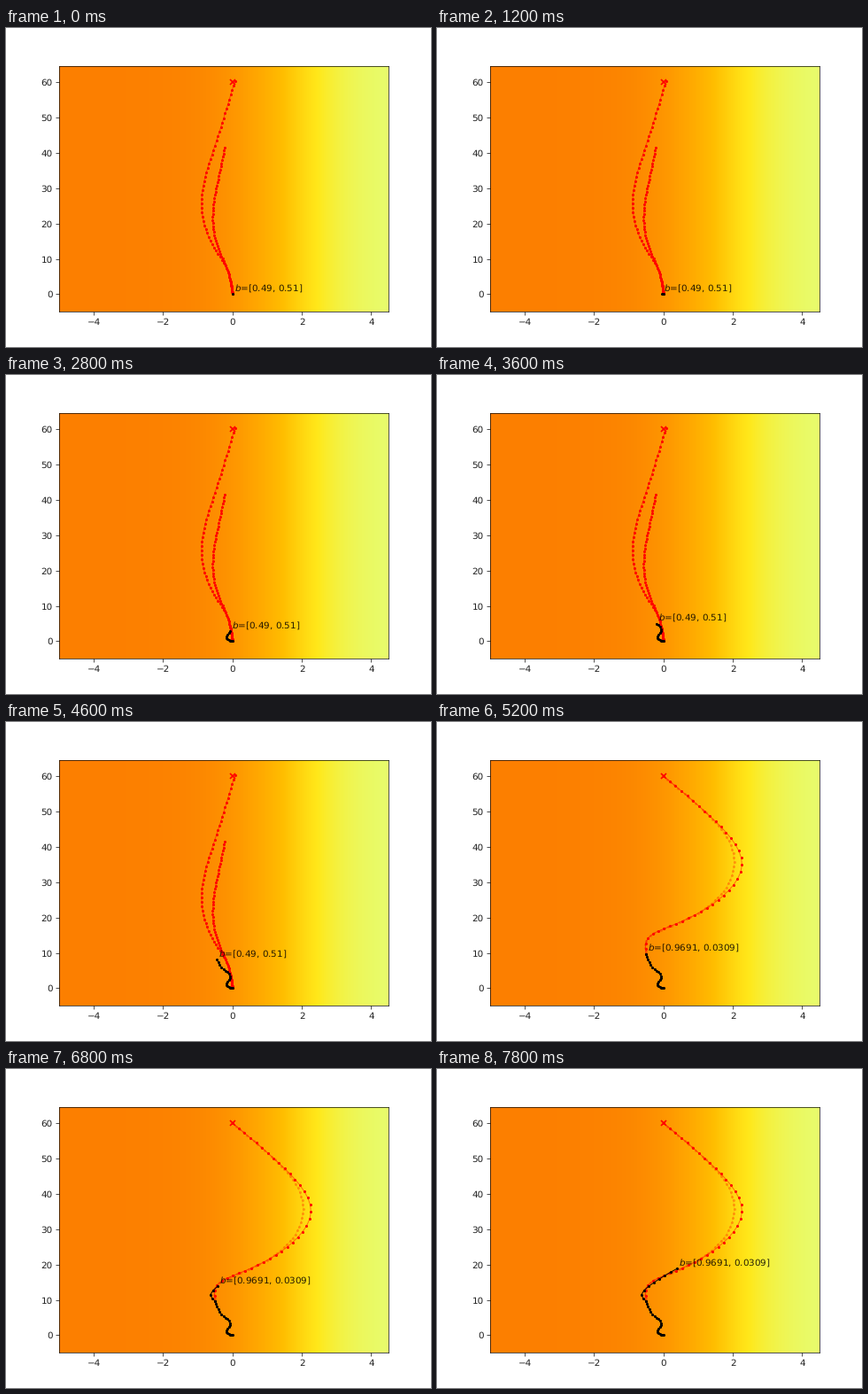
Animation, 480 px wide and 360 px high, one loop 8000 ms. Source, as a matplotlib script:

```python
import numpy as np
import matplotlib.pyplot as plt
from matplotlib.animation import FuncAnimation

plt.rcParams.update({
    "font.family": "DejaVu Sans", "text.hinting": "none",
    "axes.linewidth": 0.65, "xtick.major.width": 0.65,
    "ytick.major.width": 0.65, "xtick.labelcolor": "#222222",
    "ytick.labelcolor": "#222222",
})

XLIM, YLIM = (-5, 4.5), (-5, 64.5)
SCALE = np.array([39.16, 3.99])   # pixels per data unit
REPLAN, STEPS = 22, 31            # step of the second plan, last step

fig, ax = plt.subplots(figsize=(6.4, 4.8), dpi=75)

# Light-dark field: uncertainty falls off towards the right
xs = np.linspace(*XLIM, 760)
field = 1 / (1 + np.exp((xs - 1.45) / 0.93))
ax.imshow(field[None, :], cmap="Wistia", vmin=0, vmax=1, aspect="auto",
          extent=(*XLIM, *YLIM))
ax.set_xlim(XLIM)
ax.set_ylim(YLIM)


def arc(pts):
    """Cumulative on-screen length along a polyline."""
    seg = np.hypot(*(np.diff(pts, axis=0) * SCALE).T)
    return np.concatenate([[0], np.cumsum(seg)])


def spline(keys, n=600):
    """Natural cubic spline through a few key points."""
    p = np.array(keys, float)
    t = arc(p)
    h = np.diff(t)
    slope = np.diff(p, axis=0) / h[:, None]
    mat, rhs = np.eye(len(p)), np.zeros_like(p)
    for j in range(1, len(p) - 1):
        mat[j, j - 1:j + 2] = h[j - 1], 2 * (h[j - 1] + h[j]), h[j]
        rhs[j] = 6 * (slope[j] - slope[j - 1])
    bend = np.linalg.solve(mat, rhs)
    u = np.linspace(0, t[-1], n)
    i = np.clip(np.searchsorted(t, u, side="right") - 1, 0, len(h) - 1)
    w = h[i][:, None]
    b = (u - t[i])[:, None] / w
    a = 1 - b
    return (a * p[i] + b * p[i + 1]
            + ((a**3 - a) * bend[i] + (b**3 - b) * bend[i + 1]) * w**2 / 6)


def sample(curve, n, ease):
    """n points along the curve, spaced by an easing of its length."""
    s = ease(np.linspace(0, 1, n))
    length = arc(curve)
    s = s / s[-1] * length[-1]
    return np.column_stack([np.interp(s, length, c) for c in curve.T])


def power(p):
    return lambda u: u**p


def settle(u):
    """Slow start that settles at a steady speed."""
    return u - 0.24 * (1 - np.exp(-4 * u))


def branch(curve, n, ease, alpha=1.0):
    x, y = sample(curve, n, ease).T
    line, = ax.plot(x, y, "r-", lw=0.9, alpha=0.5 * alpha)
    dots, = ax.plot(x, y, "r.", ms=3.8, alpha=alpha)
    return [line, dots]


stem = [(0, 0), (-.15, 6.9)]
left = spline(stem + [(-.56, 13.7), (-.89, 25), (-.51, 42), (.07, 60.4)])
right = spline(stem + [(-.46, 14.2), (-.57, 21.2), (-.4, 33.2), (-.22, 41.6)])

turn = (-.5, 9.7)
wide = spline([turn, (-.5, 13.3), (.03, 16.9), (1.36, 23.4),
               (2.26, 34.4), (1.36, 48.5), (0, 60)])
# The unlikely branch cuts the bend a little shorter
tight = wide.copy()
tight[:, 0] -= 0.23 * np.exp(-((wide[:, 1] - 34.4) / 9)**2)

plan_a = branch(left, 60, settle) + branch(right, 60, settle)
plan_b = branch(tight, 60, power(1.1), 0.22) + branch(wide, 38, power(1.1))

ax.plot(0, 60, "rx", ms=6, mew=1.6)

# Vehicle track: a slow start to the turn, then along the second plan
leg_a = spline([(0, 0), (-.17, 1), (-.07, 3.1), (-.27, 5.5), turn])
leg_b = spline([turn, (-.63, 10.9), (-.35, 14.4), (.4, 18.9)])
walk = np.vstack([sample(leg_a, REPLAN, power(1.5)),
                  sample(leg_b, STEPS - REPLAN + 1, power(1.25))])

trail, = ax.plot([], [], "k.-", lw=0.9, ms=3.8)
label = ax.text(0, 0, "", alpha=0.85)


def step_at(i):
    """Each plan is held for one second before it is followed."""
    return min(max(i - 4, 0), REPLAN) if i < 31 else min(i - 8, STEPS)


def draw(i):
    k = step_at(i)
    late = k >= REPLAN
    for art in plan_a:
        art.set_visible(not late)
    for art in plan_b:
        art.set_visible(late)
    trail.set_data(*walk[:k + 1].T)
    label.set_position(walk[k] + (.05, .9))
    label.set_text("$b$=[0.9691, 0.0309]" if late else "$b$=[0.49, 0.51]")
    return [*plan_a, *plan_b, trail, label]


anim = FuncAnimation(fig, draw, frames=40, interval=200, repeat=True,
                     repeat_delay=0, blit=False)
plt.show()
```
